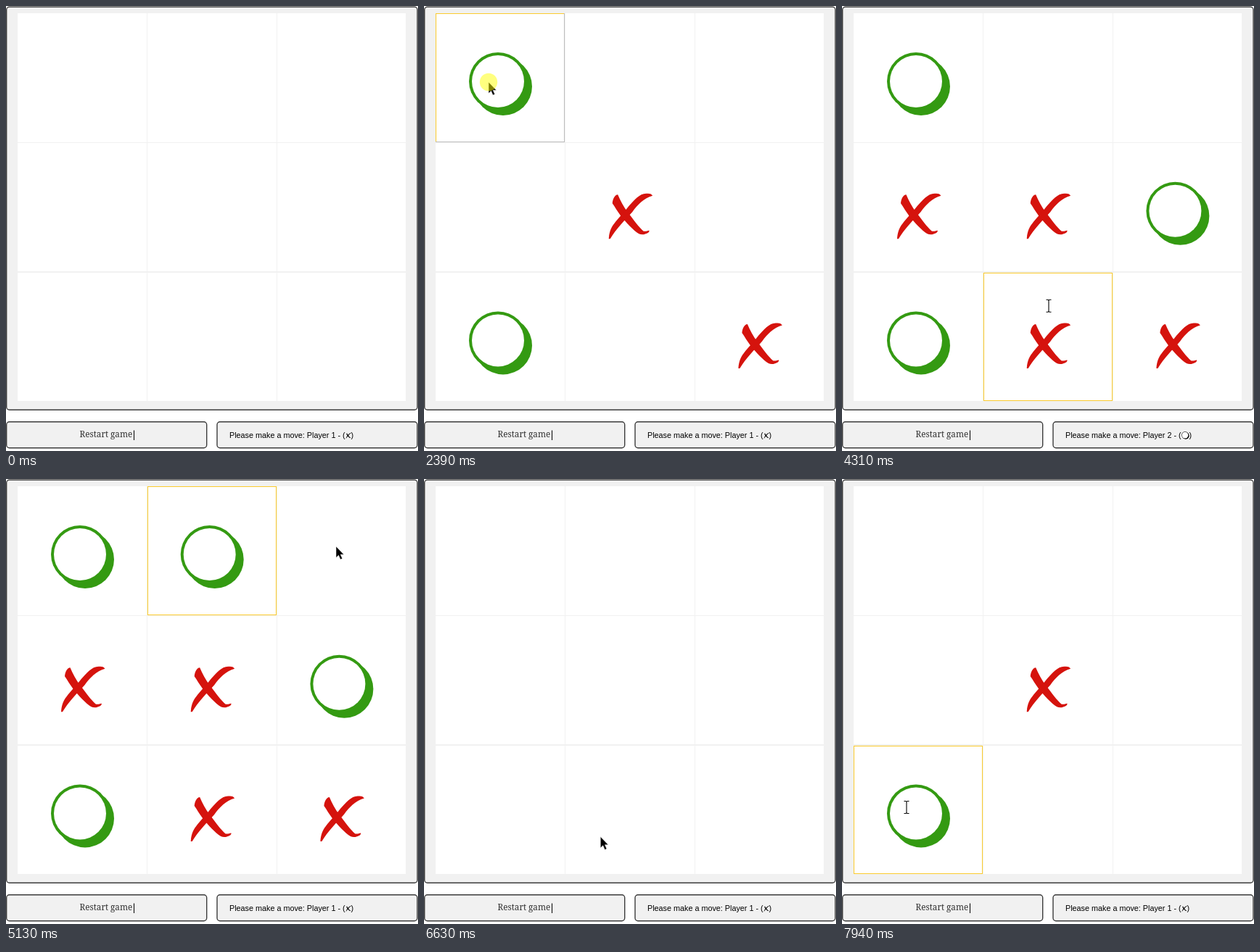
An HTML page for the animation above (8000 ms loop, 568x614 px).

```html
<!DOCTYPE html>
<html lang="en">
<head>
<meta charset="utf-8">
<title>Noughts and crosses</title>
<style>
  html, body { margin: 0; width: 100%; height: 100%; overflow: hidden; background: #fff; }
  svg { display: block; width: 568px; height: 614px; }
  .panel { fill: #f1f1f1; stroke: #3c3c3c; stroke-width: 1.4; }
  .status { font: 10.8px "Liberation Sans", Arial, sans-serif; fill: #000; }
  .button { font: 11.7px "Noto Serif", serif; fill: #333; }
</style>
</head>
<body>
<svg viewBox="0 0 568 614">
  <defs>
    <g id="cross">
      <path d="M-24.5 -18C-24 -24 -21 -30 -17 -30C-13.5 -22 -9 -13 -3 -5.5C5 5 12 15 18.5 20.5C21 21 24 20 26 19.5C27 20 26 21 25 22.5C21 25 16 26 12 24C4 19 -5 9 -12.5 0C-17 -6 -21 -13 -24.5 -18Z"/>
      <path d="M29 -30.5L31 -28.5C19 -25 10 -16 3 -6C-7 5 -20 18 -27.5 31L-29.5 31C-29 23 -27 16 -22 10C-17 3 -8 -6 -2 -14C5 -22 13 -31.5 22 -31.5C26 -31.5 28 -31.3 29 -30.5Z"/>
    </g>
    <g id="nought">
      <circle cx="3.5" cy="-.5" r="40"/>
      <circle cx="-3.5" cy="-7.5" r="40"/>
      <circle cx="-3.5" cy="-7.5" r="36" fill="#fff"/>
    </g>
  </defs>

  <rect class="panel" x=".7" y="1.2" width="566.4" height="556" rx="4"/>
  <rect class="panel" x=".7" y="573.7" width="276" height="36" rx="4"/>
  <rect class="panel" x="291" y="573.7" width="276" height="36" rx="4"/>
  <text class="button" x="101.5" y="595">Restart game</text>
  <path d="M176.5 585.5V599" stroke="#000"/>

  <g id="board"></g>
  <path id="caret" d="M253.5 220V350" stroke="#000"/>

  <text class="status" id="message" x="308" y="596"></text>
  <g id="turn">
    <use id="turnMark"/>
    <text class="status" id="closing" y="596">)</text>
  </g>

  <g id="pointer">
    <path id="arrow" d="M0 0V15.5L3.5 12.2L6 18L8.7 16.8L6.2 11.2H10.8Z" stroke="#fff" stroke-width=".5"/>
    <path id="beam" d="M-3.5 -8.5H-1.5Q0 -8.5 0 -7V7Q0 8.5 -1.5 8.5H-3.5M3.5 -8.5H1.5Q0 -8.5 0 -7M0 7Q0 8.5 1.5 8.5H3.5" fill="none" stroke="#000" stroke-width="1.1"/>
    <circle id="glow" r="12.2" fill="#ff0" opacity=".5"/>
  </g>
</svg>
<script>
const LOOP = 8000, GLOW = 140, SETTLE = 70, STEP = 178.7;
const YELLOW = '#fbcb2e', GREY = '#bdbdbd';
const $ = id => document.getElementById(id);
const show = (el, on) => el.setAttribute('visibility', on ? 'visible' : 'hidden');

// The pointer enters, then clicks; wait is the rest before it moves on.
const stops = [
  { time: 330, x: 467, y: 568, wait: 0 },
  { time: 610, x: 259, y: 290, wait: 400 },
  { time: 1220, x: 98, y: 473, wait: 210 },
  { time: 1620, x: 483, y: 480, wait: 210 },
  { time: 2320, x: 89, y: 105, wait: 340 },
  { time: 2940, x: 115, y: 290, wait: 210 },
  { time: 3480, x: 422, y: 257, wait: 210 },
  { time: 4040, x: 285, y: 443, wait: 263 },
  { time: 4650, x: 280, y: 95, wait: 340 },
  { time: 5190, x: 455, y: 93, wait: 340 },
  { time: 6360, x: 244, y: 582, wait: 210 },
  { time: 7180, x: 223, y: 289, wait: 150 },
  { time: 7730, x: 89, y: 453, wait: LOOP }
];
const [entry, ...clicks] = stops;
const restarts = p => p.y > 557;
const cellAt = p => Math.floor((p.x - 16) / 179) + 3 * Math.floor((p.y - 10) / 179);

function make(tag, parent, attrs) {
  const el = document.createElementNS('http://www.w3.org/2000/svg', tag);
  for (const k in attrs) el.setAttribute(k, attrs[k]);
  return parent.appendChild(el);
}

const greySides = { 0: 'RB', 4: 'LTB' };
const cells = Array.from({ length: 9 }, (_, i) => {
  const col = i % 3, row = Math.floor(i / 3);
  const x = 16 + 179 * col, y = 10 + 179 * row;
  const width = col < 2 ? 178 : 177, height = row ? 177 : 178;
  const cx = 105.5 + STEP * col, cy = 111.5 + STEP * row;
  make('rect', $('board'), { x, y, width, height, fill: '#fff' });
  const mark = make('use', $('board'), { transform: `translate(${cx} ${cy})` });
  const ring = make('g', $('board'), {});
  const sides = {
    L: `M${x + .5} ${y}v${height}`,
    T: `M${x} ${y + .5}h${width}`,
    B: `M${x} ${y + height - .5}h${width}`,
    R: `M${x + width - .5} ${y}v${height}`
  };
  for (const s in sides) {
    make('path', ring, { d: sides[s], stroke: greySides[i]?.includes(s) ? GREY : YELLOW });
  }
  return { cx, y, mark, ring };
});

function gameAt(t) {
  let marks = [], turn = 0, focus, last = -LOOP;
  for (const p of clicks) {
    if (p.time > t) break;
    last = p.time;
    focus = cellAt(p);
    if (restarts(p)) {
      marks = [];
      turn = 0;
    } else {
      marks[focus] = turn++ % 2 ? 'nought' : 'cross';
    }
  }
  return { marks, focus, turn, last };
}

// Sideways motion eases at both ends; vertical motion only slows down.
function pointerAt(t) {
  const next = stops.findIndex(p => p.time - SETTLE > t && p !== entry);
  const to = stops.at(next), from = next < 0 ? to : stops[next - 1];
  const start = from.time + from.wait;
  const u = Math.max(0, Math.min(1, (t - start) / (to.time - SETTLE - start)));
  return {
    x: from.x + (to.x - from.x) * u * u * (3 - 2 * u),
    y: from.y + (to.y - from.y) * (1 - (1 - u) ** 3),
    moving: u > 0 && u < 1
  };
}

function drawStatus(turn) {
  const full = turn === 9, second = turn % 2;
  $('message').textContent = full
    ? 'No one did win and the board is full.'
    : `Please make a move: Player ${second + 1} - (`;
  show($('turn'), !full);
  $('turnMark').setAttribute('href', second ? '#nought' : '#cross');
  $('turnMark').setAttribute('transform', `translate(${second ? 473.4 : 472.2} 593) scale(.12)`);
  $('closing').setAttribute('x', second ? 478.6 : 475.6);
}

function drawPointer(t, marks, glow) {
  const seen = t >= entry.time;
  const { x, y, moving } = pointerAt(t);
  const overText = moving && cells.some((c, i) =>
    marks[i] && Math.abs(x - c.cx) < 48 && Math.abs(y - c.y - 96) < 65);
  $('pointer').setAttribute('transform', `translate(${x.toFixed(2)} ${y.toFixed(2)})`);
  show($('arrow'), seen && !overText);
  show($('beam'), seen && overText);
  show($('glow'), glow);
}

function draw(t) {
  const { marks, focus, turn, last } = gameAt(t);
  const glow = t - last < GLOW;
  cells.forEach((c, i) => {
    show(c.mark, marks[i]);
    if (marks[i]) c.mark.setAttribute('href', '#' + marks[i]);
    c.mark.setAttribute('fill', marks[i] === 'cross' ? '#d5130d' : '#349a12');
    show(c.ring, i === focus);
  });
  show($('caret'), glow && last === clicks.at(-2).time);
  drawStatus(turn);
  drawPointer(t, marks, glow);
}

function tick() {
  draw(performance.now() % LOOP);
  requestAnimationFrame(tick);
}
tick();
</script>
</body>
</html>
```
